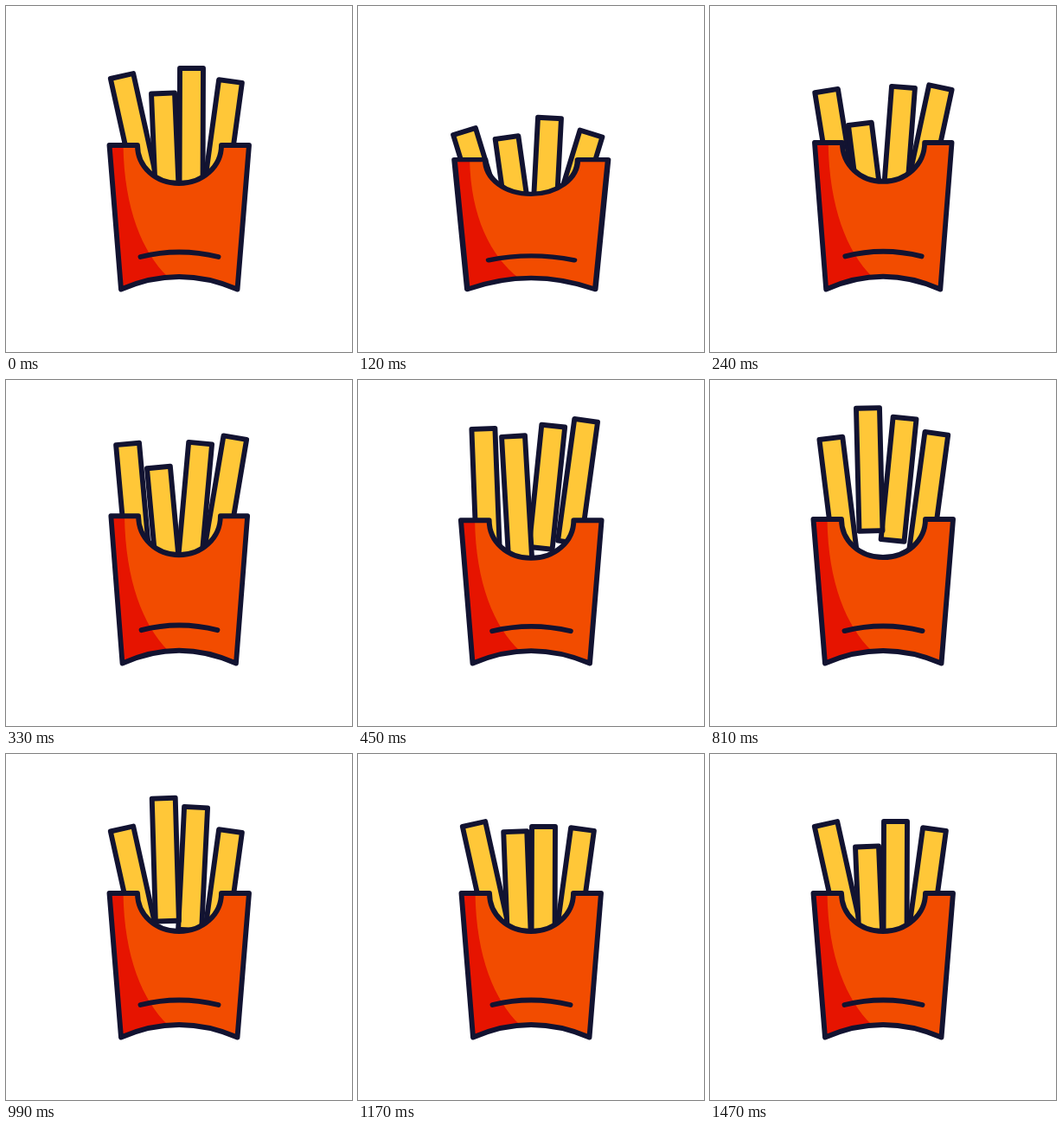
Write an HTML page that moves like this. It is 400x400 px and loops after 3.86 s.

```html
<!DOCTYPE html>
<html lang="en">
<head>
<meta charset="utf-8">
<title>Fries</title>
<style>
  html, body { margin: 0; width: 100%; height: 100%; overflow: hidden; background: #fff; }
  svg { display: block; width: 100%; height: 100%; }
  .line { stroke: #121331; stroke-width: 5.9; stroke-linejoin: round; stroke-linecap: round; }
  .fry { fill: #ffc738; }
</style>
</head>
<body>
<svg viewBox="0 0 400 400">
  <defs>
    <path id="shape" d="M119.5 161H152C152 186 173 205 200 205S249 186 249 161H281L267.5 327.5Q200 298.5 133 327.5Z"/>
    <clipPath id="inside"><use href="#shape"/></clipPath>
  </defs>
  <g id="fries"></g>
  <g id="box">
    <use href="#shape" fill="#f24c00"/>
    <path clip-path="url(#inside)" fill="#e61400" d="M110 155H135.5C135.5 232 157 284 187 313V335H110Z"/>
    <use href="#shape" class="line" fill="none"/>
    <path class="line" fill="none" d="M155.5 290Q200 279 245.5 290"/>
  </g>
</svg>
<script>
const LOOP = 3860, STEP = 30, END = 1470, DIP = 120;
const BOUNCE = 6, BOUNCE_TIME = 150;

// Poses: x and y of the top edge's middle, angle.
// The fry is pressed down, launched, peaks and lands; lift raises its first pose.
const fries = [
  { rest: [134, 81, -12.5], low: [123, 145, -17], high: [145.5, 54, -1.8], launch: 120, peak: 515, land: 935, lift: 0 },
  { rest: [214.5, 78, 0.2], low: [221.5, 129.5, 3], high: [226.5, 39.5, 6.4], launch: 120, peak: 660, land: 1095, lift: 6 },
  { rest: [181.5, 107, -2.4], low: [172, 152, -8], high: [182.5, 30.5, -1.4], launch: 205, peak: 730, land: 1230, lift: 6 },
  { rest: [259.5, 87, 7.8], low: [269.5, 147.5, 17], high: [263.5, 44, 7.5], launch: 120, peak: 515, land: 973, lift: 0 }
];

const span = (t, a, b) => Math.min(Math.max((t - a) / (b - a), 0), 1);
const smooth = u => u * u * (3 - 2 * u);
const mix = (a, b, f) => a.map((v, i) => v + (b[i] - v) * f);

function pose({ rest, low, high, launch, peak, land, lift }, t) {
  const [x, y, angle] = rest;
  if (t < launch) return mix([x, y - lift, angle], low, smooth(span(t, 0, DIP)));
  if (t < peak) return mix(low, high, 1 - (1 - span(t, launch, peak)) ** 2);
  if (t < land) return mix(high, rest, span(t, peak, land) ** 2);
  return [x, y + BOUNCE * Math.sin(Math.PI * span(t, land, land + BOUNCE_TIME)), angle];
}

// 1 when fully squashed, then a damped swing.
function squash(t) {
  if (t < DIP) return smooth(t / DIP);
  const d = t - DIP;
  return Math.exp(-d / 147) * Math.cos(Math.PI * d / 190);
}

const tray = document.getElementById('fries');
const box = document.getElementById('box');
const sticks = fries.map(() => {
  const el = document.createElementNS('http://www.w3.org/2000/svg', 'rect');
  el.setAttribute('class', 'line fry');
  el.setAttribute('x', -13.5);
  el.setAttribute('width', 27);
  el.setAttribute('height', 142);
  return tray.appendChild(el);
});

function draw(t) {
  fries.forEach((fry, i) => {
    const [x, y, angle] = pose(fry, t);
    sticks[i].setAttribute('transform', `translate(${x} ${y}) rotate(${angle})`);
  });
  const q = 0.1 * squash(t);
  box.setAttribute('transform', `translate(200 328) scale(${1 + q} ${1 - q}) translate(-200 -328)`);
}

const start = performance.now();
function tick() {
  const t = (performance.now() - start) % LOOP;
  draw(Math.min(Math.floor(t / STEP) * STEP, END));
  requestAnimationFrame(tick);
}
tick();
</script>
</body>
</html>
```
